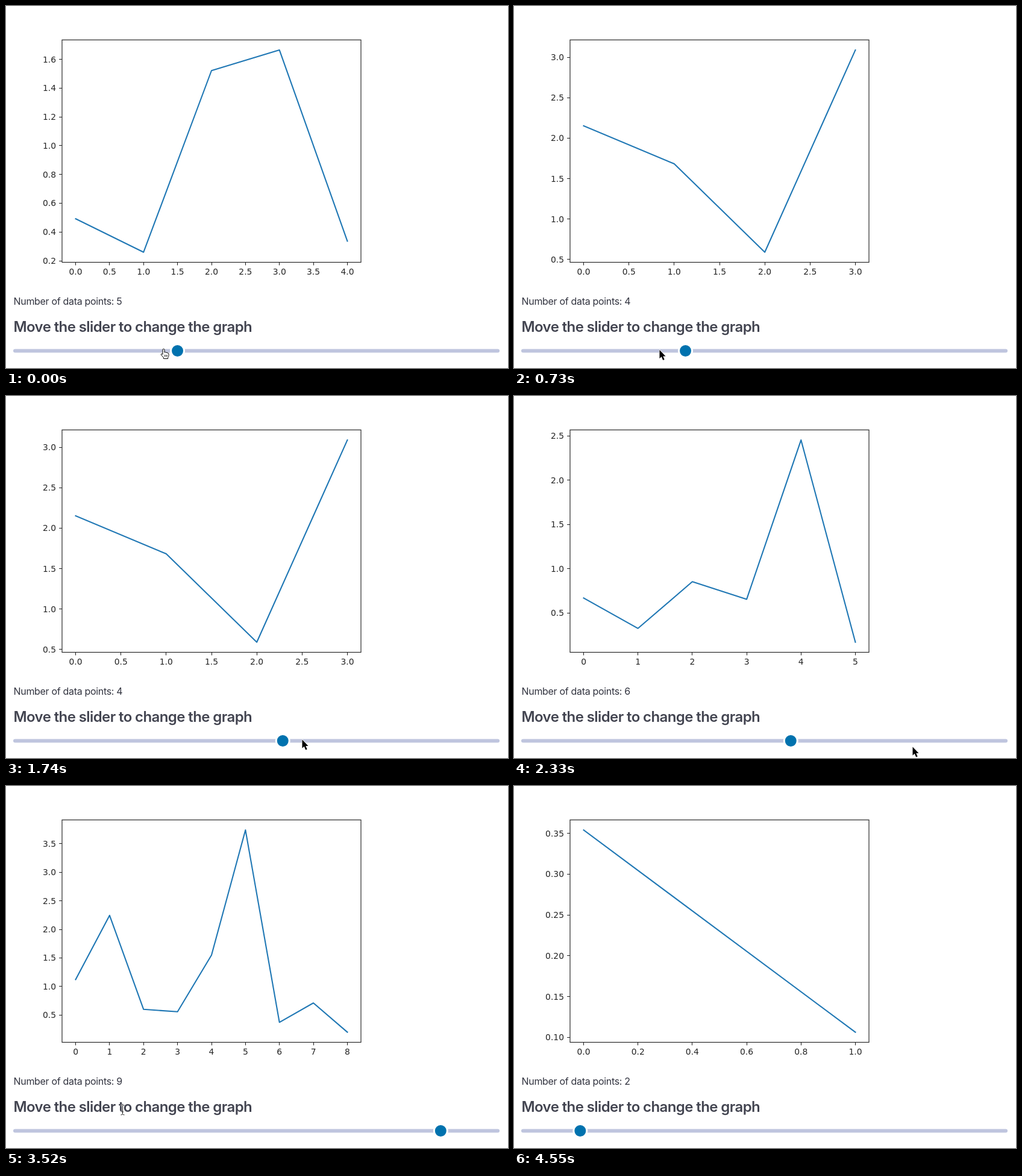
These frames come from a looping animation (833 by 601 pixels, 5.32 s). An HTML page:

```html
<!DOCTYPE html>
<html lang="en">
<head>
<meta charset="utf-8">
<title>Slider and graph</title>
<style>
  html, body { margin: 0; width: 100%; height: 100%; overflow: hidden; background: #fff; }
  svg { display: block; }
  .axis { font: 13.89px "DejaVu Sans", sans-serif; fill: #262626; }
  .note { font: 400 16px Inter, sans-serif; letter-spacing: -.02em; fill: #31333f; }
  .head { font: 600 24px Inter, sans-serif; letter-spacing: -.025em; fill: #424450; }
</style>
</head>
<body>
<svg id="stage" width="833" height="601" viewBox="0 0 833 601">
  <g id="chart"></g>
  <text id="note" class="note" x="12.5" y="496"></text>
  <text class="head" x="12.5" y="541">Move the slider to change the graph</text>
  <rect x="12" y="569.5" width="807" height="6" rx="3" fill="#bfc5de"/>
  <circle id="thumb" cy="572.5" r="11" fill="#0072ae" stroke="#fff" stroke-width="3"/>
  <g id="cursor" stroke-linejoin="round"></g>
</svg>
<script>
const LOOP = 5320;
const BOX = { left: 93, top: 56.3, width: 496, height: 369.2 };
const $ = id => document.getElementById(id);

// y values, with the tick spacing of both axes
const charts = {
  5: { ys: [.492, .26, 1.522, 1.665, .337], dx: .5, dy: .2 },
  4: { ys: [2.153, 1.683, .59, 3.091], dx: .5, dy: .5 },
  6: { ys: [.67, .327, .854, .656, 2.454, .171], dx: 1, dy: .5 },
  9: { ys: [1.122, 2.245, .6, .558, 1.549, 3.739, .373, .711, .2], dx: 1, dy: .5 },
  2: { ys: [.3542, .1064], dx: .2, dy: .05 }
};

// [step, value]: the graph follows the slider about four steps later
const sliderSteps = [[0, 4], [12, 6], [20, 9], [27, 2]];
const graphSteps = [[0, 5], [5, 4], [16, 6], [24, 9], [31, 2]];

// [step, x, y, shape]
const pointer = [
  [0, 262, 569.5, 'hand'], [1, 255, 570, 'arrow'], [5, 241.5, 571, 'arrow'],
  [7, 262, 571, 'arrow'], [11, 455, 571, 'arrow'], [12, 491.5, 570.5, 'arrow'],
  [16, 661.5, 582.5, 'arrow'], [19, 720, 570, 'arrow'], [20, 679.5, 569.5, 'arrow'],
  [24, 193.5, 538, 'beam'], [25, 160, 552, 'beam'], [26, 118, 569, 'arrow'],
  [27, 110, 570, 'hand'], [30, 110, 570, '']
];

const shapes = {
  '': '',
  arrow: '<path d="M0 0V14.2L3.2 11.2 5.7 17 8.2 16 5.8 10.4H10Z" stroke="#fff" stroke-width="1.2" paint-order="stroke"/>',
  hand: '<path d="M-2 9V1.3a1.5 1.5 0 0 1 3 0V5.6q1.6-1 2.6.3 1.6-.7 2.4.7 2-.3 2 1.6V11q0 2-1.3 3v2H-.5V14.4L-4.6 9.6Q-5 7.9-3.6 7.8Z" fill="#fff" stroke="#000"/><path d="M1 9.5V13M3.2 9.5V13M5.2 9.5V13" stroke="#000" stroke-width=".8"/>',
  beam: '<path d="M-3-8Q0-8 0-6.5Q0-8 3-8M0-6.5V6.5M-3 8Q0 8 0 6.5Q0 8 3 8M-1.5 3H1.5" fill="none" stroke="#fff" stroke-width="2.4"/><path d="M-3-8Q0-8 0-6.5Q0-8 3-8M0-6.5V6.5M-3 8Q0 8 0 6.5Q0 8 3 8M-1.5 3H1.5" fill="none" stroke="#222" stroke-width="1"/>'
};

const current = (list, step) => list.filter(item => item[0] <= step).pop();

function ticks(low, high, gap) {
  const found = [];
  for (let i = Math.ceil(low / gap); i * gap <= high; i++) found.push(i * gap);
  return found;
}

function drawChart({ ys, dx, dy }) {
  const { left, top, width, height } = BOX, bottom = top + height;
  const last = ys.length - 1, low = Math.min(...ys), span = Math.max(...ys) - low;
  // the data fills the box but for a 5% margin on each side
  const px = x => left + width * (x / last + .05) / 1.1;
  const py = y => bottom - height * ((y - low) / span + .05) / 1.1;
  const snap = v => Math.floor(v) + .5;
  let marks = '', labels = '';
  for (const x of ticks(0, last, dx)) {
    marks += `M${snap(px(x))} ${bottom}v4.9`;
    labels += `<text x="${px(x)}" y="446" text-anchor="middle">${x.toFixed(dx < 1 ? 1 : 0)}</text>`;
  }
  for (const y of ticks(low - span * .05, low + span * 1.05, dy)) {
    marks += `M${left} ${snap(py(y))}h-4.9`;
    labels += `<text x="83" y="${py(y) + 5}" text-anchor="end">${y.toFixed(dy < .1 ? 2 : 1)}</text>`;
  }
  return `<polyline points="${ys.map((y, i) => px(i) + ',' + py(y)).join(' ')}"
      fill="none" stroke="#1f77b4" stroke-width="2.08" stroke-linecap="square" stroke-linejoin="round"/>
    <path d="${marks}" stroke="#222" stroke-width="1.1"/>
    <rect x="${left}" y="${top}" width="${width}" height="${height}" fill="none" stroke="#222" stroke-width="1.15"/>
    <g class="axis">${labels}</g>`;
}

function stepAt(t) {
  return t < 2330 ? Math.min(15, Math.floor((t + 5) / 145))
                  : Math.min(31, 16 + Math.floor((t - 2330) / 147.5));
}

function drawPointer(step) {
  const from = current(pointer, step);
  const to = pointer[pointer.indexOf(from) + 1] || from;
  const part = to === from ? 0 : (step - from[0]) / (to[0] - from[0]);
  const ease = part * part * (3 - 2 * part);
  const [x, y] = [1, 2].map(i => from[i] + (to[i] - from[i]) * ease);
  $('cursor').setAttribute('transform', `translate(${x} ${y})`);
  $('cursor').innerHTML = shapes[from[3]];
}

let shownStep = -1, shownCount = 0;
function render() {
  const step = stepAt(performance.now() % LOOP);
  if (step !== shownStep) {
    shownStep = step;
    const count = current(graphSteps, step)[1];
    if (count !== shownCount) {
      shownCount = count;
      $('chart').innerHTML = drawChart(charts[count]);
      $('note').textContent = `Number of data points: ${count}`;
    }
    $('thumb').setAttribute('cx', 22.5 + 87.35 * (current(sliderSteps, step)[1] - 1));
    drawPointer(step);
  }
  requestAnimationFrame(render);
}
render();
</script>
</body>
</html>
```
